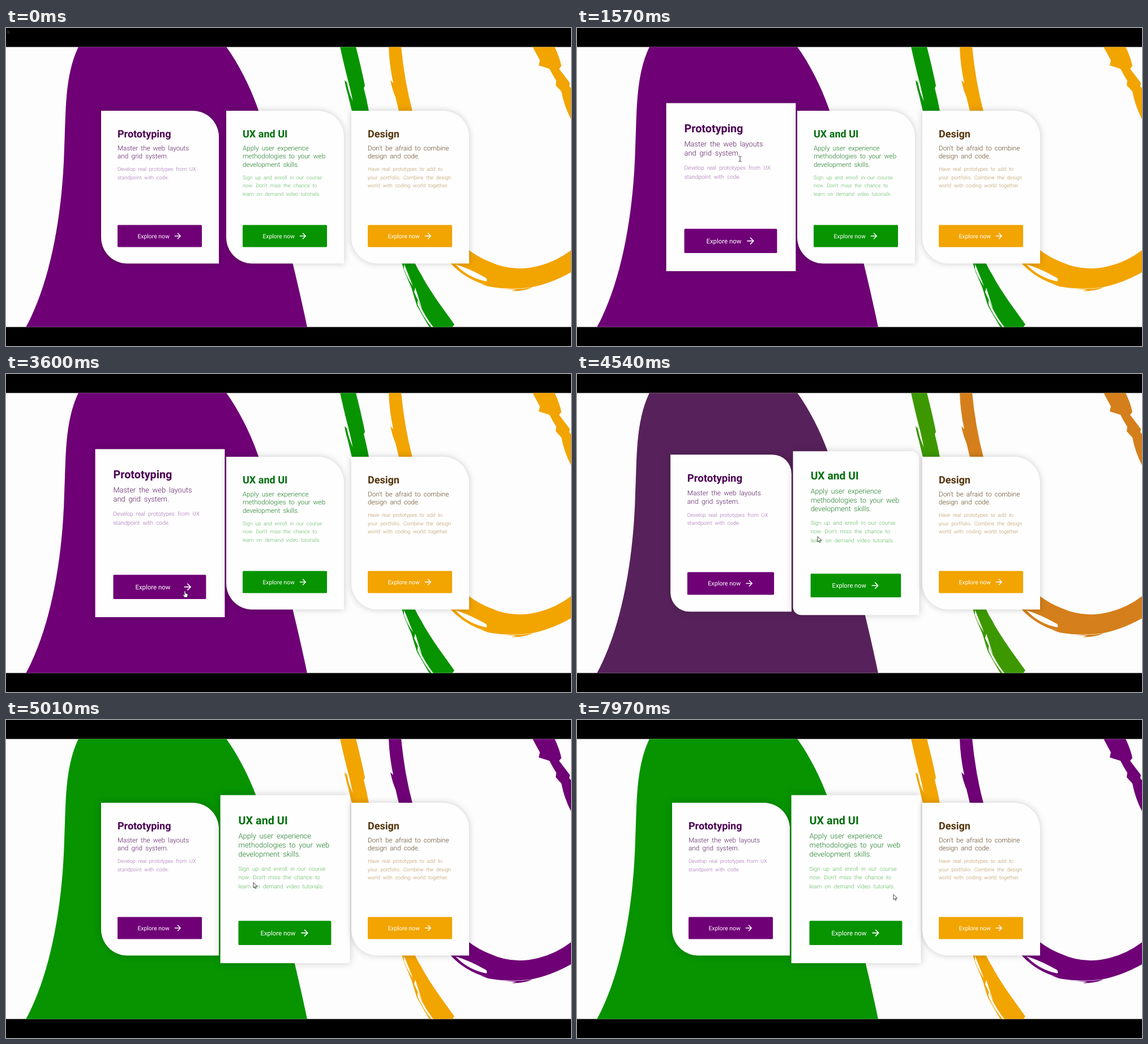
Animation, 998 px wide and 561 px high, one loop 8 s. Source, as an HTML page:

```html
<!DOCTYPE html>
<html lang="en">
<head>
<meta charset="utf-8">
<title>Course cards</title>
<style>
  html, body { margin: 0; width: 100%; height: 100%; overflow: hidden; background: #000; }
  svg { display: block; width: 100%; height: 100%; }
  text { font-family: Roboto, "Open Sans", sans-serif; text-rendering: geometricPrecision; }
  .paper { fill: #fdfdfd; }
  .title { font-size: 18px; font-weight: 700; }
  .lead { font-size: 11.7px; font-weight: 300; word-spacing: 2.4px; }
  .note { font-size: 9.1px; font-weight: 300; word-spacing: 2.5px; }
  .label { font-size: 10.4px; fill: #fff; }
  .arrow { fill: none; stroke: #fff; stroke-width: 1.4; }
  .panel { fill: #fefefe; filter: drop-shadow(0 0 6px rgba(0, 0, 0, .2)); }
  #cursor path { stroke-linejoin: round; stroke-linecap: round; }
</style>
</head>
<body>
<svg viewBox="0 0 998 561" preserveAspectRatio="none">
  <defs><clipPath id="page"><rect y="33.5" width="998" height="494"/></clipPath></defs>
  <rect width="998" height="561"/>
  <g clip-path="url(#page)">
    <rect class="paper" width="998" height="561"/>
    <path id="blob" d="M128 33C103 85 106 150 103 210C100 330 78 450 35 528H532C514 440 490 355 480 290C465 190 440 105 389 33Z"/>
    <g id="stripe">
      <path d="M590 33Q597 65 604 92Q609 110 616 147H641Q637 125 632 106L634 102Q628 72 618 33Z"/>
      <path d="M597 83Q598 98 604 118L611 147H617L614 132Q607 118 604 105L602 96L598 92Z"/>
      <path d="M699 414L704 430L716 458L722 478L726 490L742 518L748 528H788L792 523L764 484Q742 452 734 436L728 426L722 414Z"/>
      <g class="paper">
        <path d="M703 416Q712 438 719 456Q708 440 703 425Z"/>
        <path d="M723 458L721 466L735 496Z"/>
        <path d="M727 480Q738 506 755 528H752Q738 512 727 488Z"/>
      </g>
    </g>
    <g id="swirl">
      <path d="M676 33Q677 65 684 97L679 92Q682 108 688 122L694 147H718Q704 95 698 33Z"/>
      <path d="M930 33Q938 48 943 57L941 66L960 72Q966 84 972 93L971 101L981 112Q986 138 998 161V106L995 103L996 97L977 72L981 67Q978 52 969 33Z"/>
      <path d="M786 408L818 392Q835 405 856 413Q895 431 940 420Q972 412 998 392V431Q960 452 925 458Q885 462 852 456Q810 442 786 416Z"/>
      <path d="M868 459Q900 462 930 458Q912 465 893 464L902 462Z"/>
      <g class="paper">
        <path d="M794 417Q818 424 848 441Q851 445 848 447Q815 440 794 417Z"/>
        <path d="M814 439Q830 449 850 453Q828 450 814 439Z"/>
      </g>
    </g>
  </g>
  <g id="cards"></g>
  <g id="cursor">
    <path fill="#fff" stroke="#333" stroke-width=".9" d="M0 0V9L2 7.1L3.5 10.3L5 9.6L3.6 6.6H6.3Z"/>
    <path fill="none" stroke="#444" stroke-width="1" d="M-2 -4.5Q0 -4.5 0 -3.5Q0 -4.5 2 -4.5M0 -3.5V3.5M-2 4.5Q0 4.5 0 3.5Q0 4.5 2 4.5"/>
    <path fill="#fff" stroke="#222" stroke-width=".7" d="M-1 .3Q0 -.8 1 .3V4L4 4.6Q5 5 5 6.3Q5 9 3.8 11H-.8Q-2 8.6 -3.6 6.9Q-3.3 5.6 -1 7Z"/>
  </g>
</svg>
<script>
const LOOP = 8000, SWITCH = 4456;
const W = 208, H = 269.5, TOP = 146, RADIUS = 46, LINE = 14.5;
const PURPLE = [111, 0, 118], GREEN = [7, 148, 0], ORANGE = [242, 164, 0];
const $ = id => document.getElementById(id);
const rgb = c => `rgb(${c.map(Math.round)})`;
const lerp = (a, b, p) => a + (b - a) * p;
const mix = (a, b, p) => rgb(a.map((v, i) => lerp(v, b[i], p)));
const clamp = v => Math.min(1, Math.max(0, v));

// CSS "ease": cubic-bezier(.25, .1, .25, 1)
function ease(v) {
  const x = clamp(v);
  const bez = (a, b, s) => 3 * a * s * (1 - s) ** 2 + 3 * b * s * s * (1 - s) + s ** 3;
  let lo = 0, hi = 1;
  for (let i = 0; i < 20; i++) {
    const mid = (lo + hi) / 2;
    if (bez(.25, .25, mid) < x) lo = mid; else hi = mid;
  }
  return bez(.1, 1, lo);
}
const during = (t, [from, to], d) => ease((t - from) / d) - ease((t - to) / d);

const cards = [
  { x: 168, color: PURPLE, dark: '#4a0052', soft: '#a468b0', title: 'Prototyping',
    lead: ['Master the web layouts', 'and grid system.'],
    note: ['Develop real prototypes from UX', 'standpoint with code.'],
    hover: [1060, SWITCH], press: [2450, 3900] },
  { x: 389, color: GREEN, dark: '#006e0c', soft: '#5cb85c', title: 'UX and UI',
    lead: ['Apply user experience', 'methodologies to your web', 'development skills.'],
    note: ['Sign up and enroll in our course', 'now. Don\'t miss the chance to', 'learn on demand video tutorials.'],
    hover: [SWITCH, 9e3], press: [5760, 7160] },
  { x: 610, color: ORANGE, dark: '#52340a', soft: '#b9945a', title: 'Design',
    lead: ['Don\'t be afraid to combine', 'design and code.'],
    note: ['Have real prototypes to add to', 'your portfolio. Combine the design', 'world with coding world together.'],
    hover: [9e3, 9e3], press: [9e3, 9e3] }
];

const rows = (cls, fill, y, list) => list.map((s, i) =>
  `<text class="${cls}" fill="${fill}" x="29" y="${y + i * LINE}">${s}</text>`).join('');

$('cards').innerHTML = cards.map(c => `<g><path class="panel"/>
  ${rows('title', c.dark, 46.5, [c.title])}
  <g opacity=".9">${rows('lead', c.dark, 69.7, c.lead)}</g>
  ${rows('note', c.soft, 106.4 + (c.lead.length - 2) * LINE, c.note)}
  <rect x="29" y="201.5" width="149" height="39" rx="1.5" fill="${rgb(c.color)}"/>
  <text class="label" x="64.4" y="224.8">Explore now</text>
  <path class="arrow" d="M129.8 221H140M135 215.8L140.2 221L135 226.2"/></g>`).join('');
cards.forEach((c, i) => {
  c.node = $('cards').children[i];
  c.panel = c.node.querySelector('.panel');
  c.arrow = c.node.querySelector('.arrow');
});

function drawCard(c, t) {
  const p = during(t, c.hover, 200), r = RADIUS * (1 - p), s = 1 + .1 * p;
  c.node.setAttribute('transform',
    `translate(${c.x + W / 2} ${TOP + H / 2}) scale(${s}) translate(${-W / 2} ${-H / 2})`);
  c.panel.setAttribute('d',
    `M0 0H${W - r}A${r} ${r} 0 0 1 ${W} ${r}V${H}H${r}A${r} ${r} 0 0 1 0 ${H - r}Z`);
  c.arrow.setAttribute('transform', `translate(${13 * during(t, c.press, 200)} 0)`);
}

// time, x, y
const route = [
  [300, 2, 2], [1120, 262, 200], [1570, 288, 231], [1840, 290, 235], [2000, 290, 235],
  [2800, 311, 374], [3600, 316, 383], [3670, 316, 383], [4440, 386, 291], [4540, 425, 287],
  [4900, 437, 287], [5300, 437, 287], [6000, 502, 373], [6170, 503, 374], [6970, 503, 374],
  [7540, 543, 308], [7910, 543, 308], [7970, 559, 308]
];

function drawCursor(t) {
  const next = route.findIndex(k => k[0] > t);
  const b = next < 0 ? route[route.length - 1] : route[next];
  const a = next > 0 ? route[next - 1] : b;
  const v = a === b ? 1 : (t - a[0]) / (b[0] - a[0]);
  const p = v * v * (3 - 2 * v);
  const x = lerp(a[1], b[1], p), y = lerp(a[2], b[2], p);
  const hand = cards.some(c => t >= c.press[0] && t < c.press[1]);
  const shape = hand ? 2 : t > 1150 && t < 2200 ? 1 : 0;
  $('cursor').setAttribute('transform', `translate(${x} ${y})`);
  $('cursor').setAttribute('opacity', y < 30 ? .12 : 1);
  [...$('cursor').children].forEach((n, i) => n.setAttribute('display', i === shape ? 'inline' : 'none'));
}

function draw(t) {
  const p = ease((t - SWITCH) / 500);
  $('blob').setAttribute('fill', mix(PURPLE, GREEN, p));
  $('stripe').setAttribute('fill', mix(GREEN, ORANGE, p));
  $('swirl').setAttribute('fill', mix(ORANGE, PURPLE, p));
  cards.forEach(c => drawCard(c, t));
  drawCursor(t);
}

const start = performance.now();
function tick() {
  draw((performance.now() - start) % LOOP);
  requestAnimationFrame(tick);
}
tick();
</script>
</body>
</html>
```
